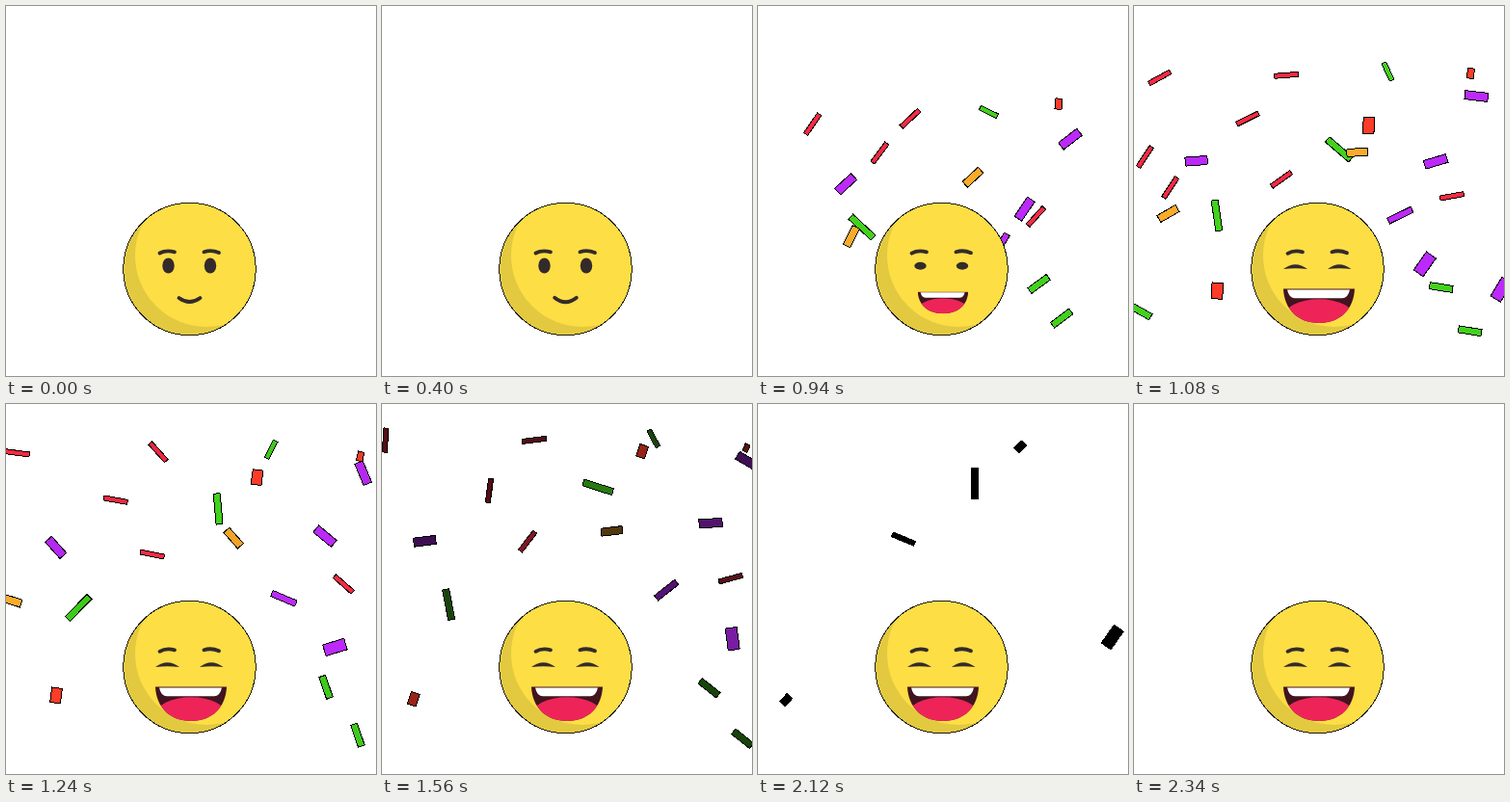
Recreate the animation shown at these times as an HTML page. Size 384 px wide and 384 px high, loop 3060 ms.

```html
<!DOCTYPE html>
<html lang="en">
<head>
<meta charset="utf-8">
<title>Laughing face with confetti</title>
<style>
  html, body { margin: 0; width: 100%; height: 100%; overflow: hidden; background: #fff; }
  svg { display: block; width: 100vw; height: 100vh; }
</style>
</head>
<body>
<svg viewBox="0 0 384 384">
  <defs>
    <clipPath id="disc"><circle cx="190.5" cy="273" r="68.7"/></clipPath>
    <clipPath id="lips"><path d="M155 293.6H229C228 315 214 329 192 329S156 315 155 293.6Z"/></clipPath>
  </defs>
  <g id="confetti" stroke="#000" stroke-width="1" shape-rendering="crispEdges"></g>
  <g clip-path="url(#disc)">
    <circle cx="190.5" cy="273" r="69" fill="#e2c93f"/>
    <circle cx="208" cy="259" r="74" fill="#fdde45"/>
  </g>
  <circle cx="190.5" cy="273" r="68.7" fill="none" stroke="#1c1a10" shape-rendering="crispEdges"/>
  <g fill="none" stroke="#332b2b" stroke-width="3.8" stroke-linecap="round">
    <path id="brows"/>
    <path id="smile"/>
  </g>
  <g id="eyes" fill="#332b2b">
    <ellipse cx="168.5" cy="269.5" rx="6.2" ry="8"/>
    <ellipse cx="212" cy="269.5" rx="6.2" ry="8"/>
  </g>
  <path id="lids" fill="#332b2b" d="M155 273Q167.5 263.5 180 273Q167.5 271.6 155 273ZM201 273Q213 263.5 225.5 273Q213 271.6 201 273Z"/>
  <g id="laugh" clip-path="url(#lips)">
    <rect x="150" y="290" width="84" height="44" fill="#42141f"/>
    <ellipse cx="192" cy="323.5" rx="37" ry="19.3" fill="#ee2459"/>
    <path d="M159 294.4H224Q222 303.3 216 303.3H167Q161 303.3 159 294.4Z" fill="#fff"/>
  </g>
</svg>
<script>
const LOOP = 3060, BIRTH = 745, LIFE = 1300, DRAG = 0.0057;
const RED = [251, 41, 67], BRICK = [255, 60, 40], GREEN = [66, 210, 28],
      PURPLE = [187, 42, 251], ORANGE = [251, 171, 41];

const $ = id => document.getElementById(id);
const clamp = v => Math.min(1, Math.max(0, v));
const ramp = (t, a, b) => clamp((t - a) / (b - a));
const smooth = u => u * u * (3 - 2 * u);
const attr = (el, map) => { for (const n in map) el.setAttribute(n, map[n]); };
const show = (el, on) => attr(el, { visibility: on ? "visible" : "hidden" });

// one burst: strips of a kind fly from one point to their resting places [x, y, delay]
function burst(color, len, wid, ends, { from = [190, 275], tilt = 102, spin = 1, shrink = 0 } = {}) {
  return ends.map(([x, y, delay = 0]) => {
    const el = document.createElementNS("http://www.w3.org/2000/svg", "rect");
    $("confetti").append(el);
    return { el, color, len, wid, from, tilt, spin, shrink, x, y, born: BIRTH + delay };
  });
}

const redFrom = [158, 285], purpleFrom = [207, 305];
const pieces = [
  burst(RED, 25, 5, [[2, 35, 12], [111, 88]], { from: redFrom, spin: 0.7 }),
  burst(RED, 25, 5, [[151, 140, 110], [158, 35], [364, 180, 20], [-65, 106, 200], [-114, 47, 200]], { from: redFrom }),
  burst(BRICK, 18, 12.5, [[272, 44, 150], [29, 307, 155]], { tilt: 90, spin: 0.1, shrink: 0.4 }),
  burst(BRICK, 12, 8, [[380, 44]], { from: [172, 220], tilt: 90, spin: 0.1, shrink: 0.4 }),
  burst(GREEN, 32, 7, [[225, 82, 150], [68, 207.5], [-156, 349, 200]], { tilt: 8 }),
  burst(GREEN, 20, 5, [[283, 33.5]], { from: [150, 267], tilt: -9 }),
  burst(GREEN, 24, 7, [[341, 295], [376, 348]], { spin: 1.18 }),
  burst(PURPLE, 24, 9, [[343, 121, 70], [381, 57]], { from: purpleFrom, spin: 1.15 }),
  burst(PURPLE, 23, 9, [[43, 141]]),
  burst(PURPLE, 27, 6.5, [[296.5, 191.5, 75]], { from: purpleFrom }),
  burst(PURPLE, 23, 12, [[368, 242, 180], [530, 285, 200]], { from: purpleFrom, spin: 0.9 }),
  burst(ORANGE, 22, 8, [[239, 130.5], [-15, 196, 90]])
].flat();

function drawPiece(p, t) {
  const age = t - p.born, alive = age > 0 && age < LIFE;
  show(p.el, alive);
  if (!alive) return;
  const rest = Math.exp(-DRAG * age);
  const x = p.x + (p.from[0] - p.x) * rest, y = p.y + (p.from[1] - p.y) * rest;
  const turn = p.tilt + p.spin * 408 * Math.pow(age / 1160, 1.38);
  const light = Math.pow(1 - ramp(age, 480, 1180), 1.7);
  const size = 1 - p.shrink * ramp(age, 0, 1000);
  const w = p.len * size, h = p.wid * size;
  attr(p.el, {
    x: -w / 2, y: -h / 2, width: w, height: h,
    fill: `rgb(${p.color.map(c => Math.round(c * light))})`,
    transform: `translate(${x} ${y}) rotate(${turn})`
  });
}

function drawFace(t) {
  const grin = smooth(ramp(t, 300, 800)), open = smooth(ramp(t, 880, 1000));
  const half = 11 + 3 * grin, top = 303 - 2 * grin, dip = 8 + 10 * grin;
  const laughing = open > 0, shut = open > 0.6;
  attr($("smile"), { d: `M${190.5 - half} ${top}Q190.5 ${top + dip} ${190.5 + half} ${top}` });
  attr($("brows"), {
    d: `M159.5 ${256.5 + 0.3 * open}Q166 253 175 255.3M205.5 255.3Q213 252.8 221 ${256 + 0.3 * open}`
  });
  attr($("eyes"), { transform: `translate(0 270) scale(1 ${1 - open}) translate(0 -270)` });
  attr($("laugh"), {
    transform: `translate(192 ${300 - 6 * open}) scale(${0.4 + 0.6 * open} ${0.25 + 0.75 * open}) translate(-192 -294)`
  });
  show($("smile"), !laughing);
  show($("laugh"), laughing);
  show($("eyes"), !shut);
  show($("lids"), shut);
}

const start = performance.now();
function tick() {
  const t = (performance.now() - start) % LOOP;
  pieces.forEach(p => drawPiece(p, t));
  drawFace(t);
  requestAnimationFrame(tick);
}
tick();
</script>
</body>
</html>
```
